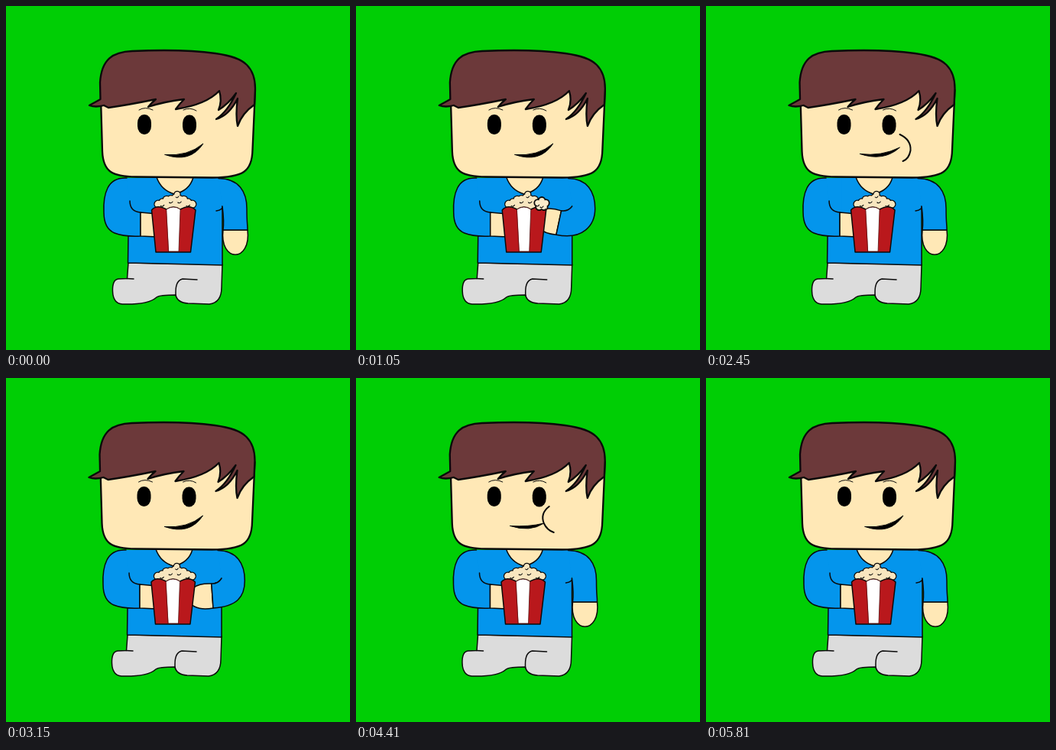
Write an HTML page that moves like this. It is 450x450 px and loops after 5880 ms.

```html
<!DOCTYPE html>
<html lang="en">
<head>
<meta charset="utf-8">
<title>Popcorn snack</title>
<style>
  html, body { margin: 0; width: 100%; height: 100%; overflow: hidden; background: #00ce05; }
  svg { display: block; width: 100vw; height: 100vh; }
  .line { fill: none; }
  .skin { fill: #ffe8b6; }
  .shirt { fill: #0495ec; }
  .pants { fill: #dcdcdc; }
  .bare { stroke: none; }
</style>
</head>
<body>
<svg viewBox="0 0 450 450" stroke="#0a0a0a" stroke-width="1.5" stroke-linecap="round" stroke-linejoin="round">
  <rect class="bare" width="450" height="450" fill="#00ce05"/>

  <g id="body">
    <path class="pants" d="M160 336L158.500 356.500L147 357Q139 358 139.500 373Q140 389 152 390Q186 391 197 381Q201 378 222 378Q224 388 238 389L266 390Q282 388 282 368L283 338Z"/>
    <path class="line" d="M158 356.500L167 357M250 358L231 357Q222 359 222 374L222 379"/>
    <path class="shirt bare" d="M158 225L283 225L283 339L160 336Z"/>
    <path class="line" d="M160 300L159.500 336L283 339L283 262M275 268Q284 267 284 260"/>
    <path class="skin" d="M197 224Q203 241 220 246Q240 242 245 224Z"/>
    <path class="shirt bare" d="M158 225L178 225L178 272L150 272Z"/>
    <path class="shirt" d="M158 225Q140 224 133 238Q127 250 128 270Q128 291 142 297Q154 302 176 301L176 270Q162 269 162 255"/>
    <path class="skin" d="M176 270L198 272L198 302L176 301Z"/>
  </g>

  <g id="head" stroke-width="2.300">
    <path class="skin" d="M124 120L126 190C127 217 139 223 170 223.500L270 224.500C310 224 322 217 322.500 188L326 110L290 80L150 80Z"/>
    <path fill="#6c393a" d="M109 130L123.500 122L123 100C125 70 139 60 165 59Q232 56 274 62Q304 66 315 77Q326 88 326 108L325 129Q309 140 303 157Q300 143 303 121Q292 143 275 148Q290 138 301 114Q291 128 278 136Q283 124 279 111Q262 129 222 135Q227 128 233 122Q207 125 186 132Q190 127 196 122Q162 129 134 133L128 130Q117 133 109 130Z"/>
    <path class="line" stroke-width="1" d="M174 136Q182 131 192 136M232 136Q241 132 249 137"/>
    <g id="eyes" class="bare" fill="#000">
      <rect x="172" y="142" width="18" height="26" rx="8.500" ry="11"/>
      <rect x="231" y="142.500" width="18" height="26" rx="8.500" ry="11"/>
    </g>
    <path id="mouth" fill="#000" stroke-width="1"/>
    <path id="cheek" class="line" stroke-width="2"/>
  </g>

  <g id="arm">
    <path id="hand" class="skin"/>
    <path id="sleeve" class="shirt"/>
  </g>

  <g id="bucket">
    <g id="corn" fill="#f8e6bf"></g>
    <path fill="#b9181c" d="M190.500 267Q197 259 210 266Q219 260 228 266Q241 259 248 267L241.500 322L196 322Z"/>
    <path fill="#fff" stroke="#511" stroke-width=".8" d="M210 266Q219 260 228 266L226 321L213 321Z"/>
  </g>
  <g id="piece" fill="#fbeccb"></g>
</svg>

<script>
const LOOP = 5880, STEP = 70, CYCLE = 2240, CHEW = 280;
const $ = id => document.getElementById(id);
const { PI, sin, cos, abs, floor } = Math;
const range = (n, make) => Array.from({ length: n }, (_, i) => make(i));

// Outline first, then the fill on top, so overlapping puffs merge.
function puffs(id, outline, blobs) {
  const circles = attrs => blobs.map(([x, y, r]) =>
    `<circle cx="${x}" cy="${y}" r="${r}" ${attrs}/>`).join("");
  const creases = blobs.map(([x, y, r], i) =>
    i % 2 ? `M${x - r / 2} ${y + r}q${r / 2} 2 ${r} -1` : "").join("");
  $(id).innerHTML = circles(`stroke-width="${outline}"`) + circles('stroke="none"') +
    `<path class="line" stroke-width="1.1" d="${creases}"/>`;
}

// A heap with a small peak, and a loose kernel shaped like a flower.
puffs("corn", 2.6, [
  ...range(9, i => [199 + i * 5.6, 261 - 10 * sin(PI * (i + .5) / 9) + i % 2, 4.4]),
  [224, 246.5, 3.5],
  ...range(3, i => [209 + i * 11, 261, 7])
]);
puffs("piece", 3.6, [
  ...range(5, i => [5.5 * cos(i * PI * .4 - .3), 4.5 * sin(i * PI * .4 - .3), 3.6]),
  [0, 0, 4]
]);

// Elbow x/y, wrist x/y and the hand's turn from hanging, in degrees.
const POSES = {
  down:  [315, 265, 300, 293, 0],
  grab:  [313, 265, 265.5, 283.5, 102],
  raise: [308, 258, 253.5, 262.5, 150],
  mouth: [312, 250, 259, 227, 157]
};
const KEYS = [[0, "down"], [700, "down"], [980, "grab"], [1080, "grab"],
  [1300, "mouth"], [1500, "mouth"], [1680, "raise"], [1820, "down"], [LOOP, "down"]];

const FACES = {
  smile: ["M208 194.5Q241 206 258 180Q238 197 208 194.5Z", ""],
  left: ["M202 193.5Q228 202 246 190Q226 195 202 193.5Z", "M253 168Q241 177 246 190Q250 199 259 202"],
  right: ["M202 193.5Q233 204 254 185Q230 197 202 193.5Z", "M254 168Q269 175 268 189Q266 200 258 203"]
};

const lerp = (a, b, k) => a + (b - a) * k;
const ease = k => k * k * (3 - 2 * k);

function armAt(u) {
  const i = KEYS.findIndex(([time]) => time > u);
  const [t0, from] = KEYS[i - 1], [t1, to] = KEYS[i];
  const k = ease((u - t0) / (t1 - t0));
  return POSES[from].map((v, n) => lerp(v, POSES[to][n], k));
}

function drawArm([ex, ey, wx, wy, turn]) {
  const a = turn * PI / 180;
  // A point so far along the hand and so far across it, seen from the wrist.
  const at = (along, across) => [wx - along * sin(a) + across * cos(a), wy + along * cos(a) + across * sin(a)];
  const outer = at(0, 16), inner = at(0, -16);
  const bend = 10 + abs(ex - outer[0]) / 2;
  const pit = [283, 262];
  const fold = [(inner[0] + pit[0]) / 2 + 2, (inner[1] + pit[1]) / 2 + 4];
  $("sleeve").setAttribute("d",
    `M278 225.5C${ex - 10} 226 ${ex} ${ey - 22} ${ex} ${ey}` +
    `C${ex} ${ey + 22} ${at(-bend, 16)} ${outer}L${inner}Q${fold} ${pit}`);
  $("hand").setAttribute("d", `M${outer}C${at(43, 21)} ${at(43, -21)} ${inner}Z`);
}

function faceAt(t, u) {
  const chewing = u >= 1610 && t < 5600 || t >= CYCLE && t < 3010;
  if (!chewing) return FACES.smile;
  return floor((t - 1610) / CHEW) % 2 ? FACES.right : FACES.left;
}

function move(id, x, y = 0) {
  $(id).setAttribute("transform", `translate(${x.toFixed(2)} ${y.toFixed(2)})`);
}

function draw(now) {
  const t = floor(now % LOOP / STEP) * STEP;
  const u = t < 2800 ? t : t - CYCLE;
  const arm = armAt(u);
  drawArm(arm);

  const [mouth, cheek] = faceAt(t, u);
  $("mouth").setAttribute("d", mouth);
  $("cheek").setAttribute("d", cheek);

  const sway = (cos(2 * PI * t / LOOP) - 1) / 2;
  const nudge = Math.max(0, 1 - abs(u - 1050) / 250);
  move("body", sway);
  move("arm", sway);
  move("head", sway / 2);
  move("bucket", sway + nudge);

  const held = u >= 980 && u < 1500;
  $("piece").setAttribute("visibility", held ? "visible" : "hidden");
  const lift = (POSES.grab[3] - arm[3]) / (POSES.grab[3] - POSES.mouth[3]);
  move("piece", lerp(243, 238, lift), lerp(259, 194, lift));
}

const start = performance.now();
function tick() {
  draw(performance.now() - start);
  requestAnimationFrame(tick);
}
tick();
</script>
</body>
</html>
```
